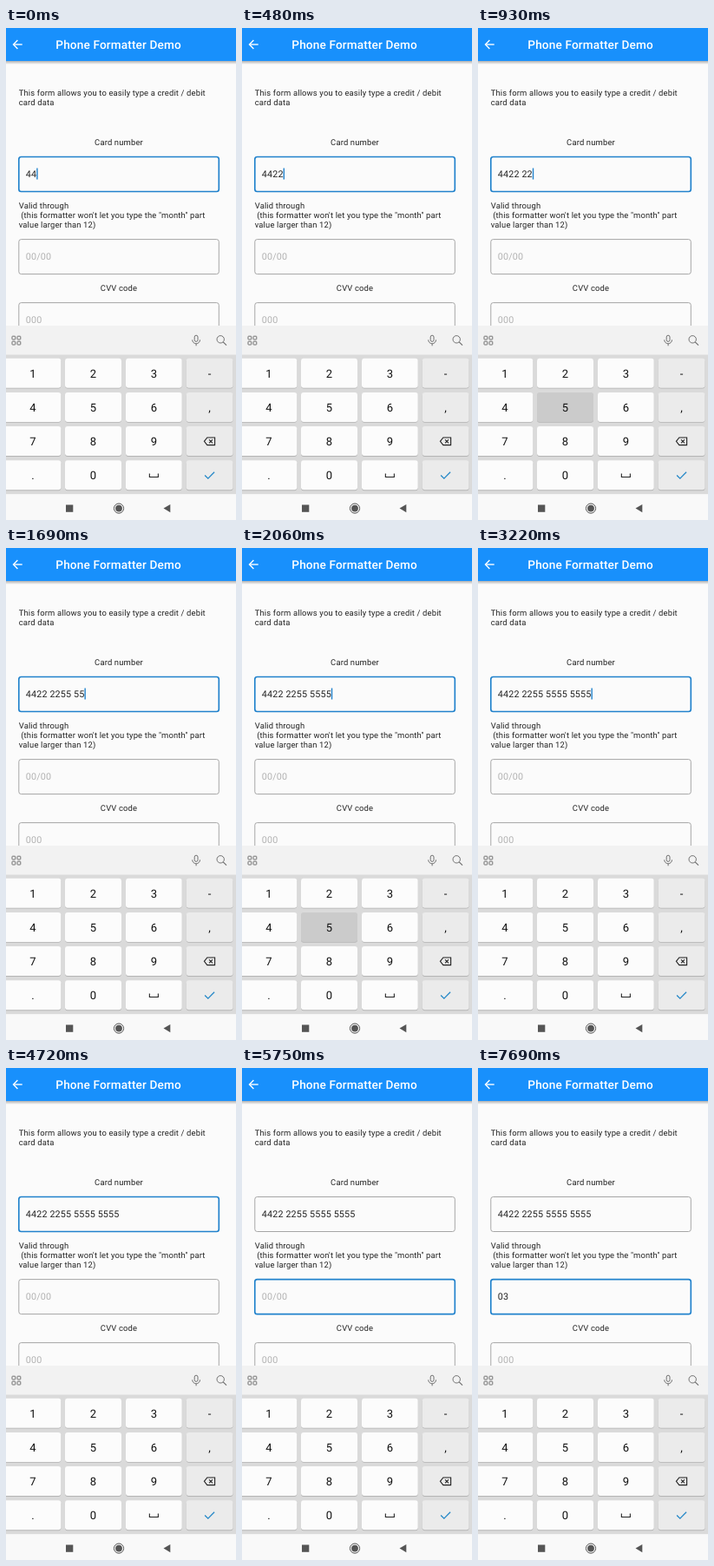
Recreate the animation shown at these times as an HTML page with a canvas. Size 265 px wide and 567 px high, loop 8 s.

```html
<!DOCTYPE html>
<html lang="en">
<head>
<meta charset="utf-8">
<title>Phone Formatter Demo</title>
<style>
html, body { margin: 0; width: 100%; height: 100%; overflow: hidden; background: #fbfbfb; }
canvas { display: block; width: 265px; height: 567px; }
</style>
</head>
<body>
<canvas id="stage"></canvas>
<script>
const W = 265, H = 567, LOOP = 8000;
const canvas = document.getElementById('stage');
const ctx = canvas.getContext('2d');
const ratio = window.devicePixelRatio || 1;
canvas.width = Math.round(W * ratio);
canvas.height = Math.round(H * ratio);

const INK = '#242424', HINT = '#b3b3b3', BLUE = [33, 130, 204], GREY = [158, 158, 158];
const BODY = 9.43, INPUT = 10.78;

// key, pressed at, released at, text appears at
const presses = [
  ['2', 210, 260, 300], ['2', 390, 440, 480], ['2', 570, 630, 670], ['2', 760, 830, 870],
  ['5', 910, 970, 1080], ['5', 1120, 1180, 1220], ['5', 1310, 1380, 1420], ['5', 1520, 1600, 1640],
  ['5', 1730, 1770, 1810], ['5', 1890, 1950, 1990], ['5', 2030, 2080, 2120], ['5', 2170, 2220, 2260],
  ['5', 2310, 2370, 2410], ['5', 2450, 2600, 2640], ['5', 2740, 2800, 2840], ['5', 2890, 3220, 3220],
  ['0', 7070, 7130, 7150], ['3', 7230, 7310, 7330]
];
const FOCUS_MOVE = 5220;
const cardCursor = [[0, 3770], [4220, 4720], [5180, 5250]];
const dateCursor = [[5250, 5750], [6270, 6730], [7150, 7690]];

const keyRows = [['1', '2', '3', '-'], ['4', '5', '6', ','], ['7', '8', '9', 'back'], ['.', '0', 'space', 'done']];
const keyCols = [[-3, 66.3], [68, 65], [138, 64.7], [207.7, 53.8]];

const within = (t, spans) => spans.some(([a, b]) => t >= a && t < b);
const mix = (a, b, k) => `rgb(${a.map((v, i) => Math.round(v + (b[i] - v) * k)).join(',')})`;
const typed = (t, from, to) =>
  presses.filter(p => p[3] >= from && p[3] < to && p[3] <= t).map(p => p[0]).join('');

function rect(x, y, w, h, color) {
  ctx.fillStyle = color;
  ctx.fillRect(x, y, w, h);
}

function box(x, y, w, h, r) {
  ctx.beginPath();
  ctx.roundRect(x, y, w, h, r);
}

function line(points, color, width, closed) {
  ctx.beginPath();
  points.forEach(([x, y], i) => i ? ctx.lineTo(x, y) : ctx.moveTo(x, y));
  if (closed) ctx.closePath();
  ctx.strokeStyle = color;
  ctx.lineWidth = width;
  ctx.stroke();
}

function text(str, x, y, size, color = INK, align = 'left', weight = 400, spacing = 0.15) {
  ctx.font = `${weight} ${size}px Roboto, sans-serif`;
  ctx.letterSpacing = spacing + 'px';
  ctx.textRendering = 'geometricPrecision';
  ctx.textAlign = align;
  ctx.fillStyle = color;
  ctx.fillText(str, x, y);
  return ctx.measureText(str).width;
}

function appBar() {
  const shade = ctx.createLinearGradient(0, 38, 0, 42);
  shade.addColorStop(0, 'rgba(0,0,0,.3)');
  shade.addColorStop(1, 'rgba(0,0,0,0)');
  rect(0, 38, W, 4, shade);
  rect(0, 0, W, 38, '#1890fc');
  line([[18.7, 19], [8.8, 19]], '#fff', 1.35);
  line([[13.4, 14.1], [8.5, 19], [13.4, 23.9]], '#fff', 1.35);
  text('Phone Formatter Demo', 57.3, 24, 13.6, '#fff', 'left', 500);
}

function field(y, focus, value, hint, cursor) {
  box(14.8, y, 230.5, 40, 2.7);
  ctx.strokeStyle = mix(GREY, BLUE, focus);
  ctx.lineWidth = 0.9 + 0.75 * focus;
  ctx.stroke();
  const base = y + 23.2;
  if (!value) text(hint, 22.8, base, INPUT, HINT);
  const end = value ? 22.8 + text(value, 22.8, base, INPUT) : 22.8;
  if (cursor) rect(end, y + 13, 1.4, 13, '#2182cc');
}

function form(t) {
  const k = Math.min(1, Math.max(0, (t - FOCUS_MOVE) / 200));
  const focus = k * k * (3 - 2 * k);
  const card = ('44' + typed(t, 0, 5000)).slice(0, 16).replace(/(\d{4})(?=\d)/g, '$1 ');

  text('This form allows you to easily type a credit / debit', 14.7, 78.3, BODY);
  text('card data', 14.7, 89.4, BODY);
  text('Card number', 130, 135.2, BODY, INK, 'center');
  field(148.5, 1 - focus, card, '', within(t, cardCursor));
  text('Valid through', 14.7, 208.2, BODY);
  text(' (this formatter won\'t let you type the "month" part', 14.7, 219.3, BODY);
  text('value larger than 12)', 14.7, 230.4, BODY);
  field(243.6, focus, typed(t, 5000, LOOP), '00/00', within(t, dateCursor));
  text('CVV code', 130, 303.2, BODY, INK, 'center');
  field(316.6, 0, '', '000', false);
}

function toolbar() {
  rect(0, 343, W, 33.5, '#f2f2f2');
  const c = '#707070';
  ctx.strokeStyle = c;
  ctx.lineWidth = 1;
  for (const x of [7, 13]) for (const y of [355.2, 361.2]) {
    box(x, y, 3.8, 3.8, 0.6);
    ctx.stroke();
  }
  box(217.2, 354.2, 3.8, 7.2, 1.9);
  ctx.stroke();
  ctx.beginPath();
  ctx.arc(219.1, 359.4, 4.4, 0, Math.PI);
  ctx.stroke();
  line([[219.1, 363.8], [219.1, 366.3]], c, 1);
  ctx.beginPath();
  ctx.arc(247.2, 358.8, 4.2, 0, Math.PI * 2);
  ctx.stroke();
  line([[250.2, 361.8], [254, 365.7]], c, 1.2);
}

function keyFace(name, x, y) {
  if (name === 'back') {
    line([[x - 6.2, y], [x - 2.8, y - 4.3], [x + 6, y - 4.3], [x + 6, y + 4.3], [x - 2.8, y + 4.3]], '#222', 1.1, true);
    line([[x - 0.6, y - 2], [x + 3.4, y + 2]], '#222', 1.1);
    line([[x + 3.4, y - 2], [x - 0.6, y + 2]], '#222', 1.1);
  } else if (name === 'space') {
    line([[x - 5, y - 2], [x - 5, y + 2], [x + 5, y + 2], [x + 5, y - 2]], '#222', 1.1);
  } else if (name === 'done') {
    line([[x - 5.5, y], [x - 1.8, y + 3.7], [x + 5.5, y - 3.7]], '#2588c8', 1.3);
  } else {
    text(name, x, y + 4.7, 13, '#111', 'center', 400, 0);
  }
}

function keyboard(t) {
  rect(0, 376.5, W, 161, '#dadada');
  const held = presses.find(p => t >= p[1] && t < p[2]);
  keyRows.forEach((row, r) => row.forEach((name, c) => {
    const [x, w] = keyCols[c], y = 380.7 + 39.2 * r;
    box(x, y + 0.9, w, 34, 3);
    ctx.fillStyle = '#b4b4b4';
    ctx.fill();
    box(x, y, w, 34, 3);
    ctx.fillStyle = held && held[0] === name ? '#cbcbcb' : c === 3 ? '#ebebeb' : '#fcfcfc';
    ctx.fill();
    keyFace(name, c ? x + w / 2 : 31, y + 17.2);
  }));
}

function navBar() {
  rect(0, 537.3, W, 30, '#f9f9f9');
  const c = '#555';
  rect(69, 549.5, 8.3, 8.3, c);
  ctx.strokeStyle = c;
  ctx.lineWidth = 1;
  ctx.beginPath();
  ctx.arc(130, 553.6, 5.6, 0, Math.PI * 2);
  ctx.stroke();
  ctx.beginPath();
  ctx.arc(130, 553.6, 3.9, 0, Math.PI * 2);
  ctx.fill();
  ctx.beginPath();
  ctx.moveTo(181.5, 553.6);
  ctx.lineTo(189.3, 549);
  ctx.lineTo(189.3, 558.2);
  ctx.fill();
}

function draw(now) {
  const t = now % LOOP;
  ctx.setTransform(ratio, 0, 0, ratio, 0, 0);
  rect(0, 0, W, H, '#fbfbfb');
  form(t);
  appBar();
  toolbar();
  keyboard(t);
  navBar();
}

const start = performance.now();
function tick() {
  draw(performance.now() - start);
  requestAnimationFrame(tick);
}
tick();
</script>
</body>
</html>
```
